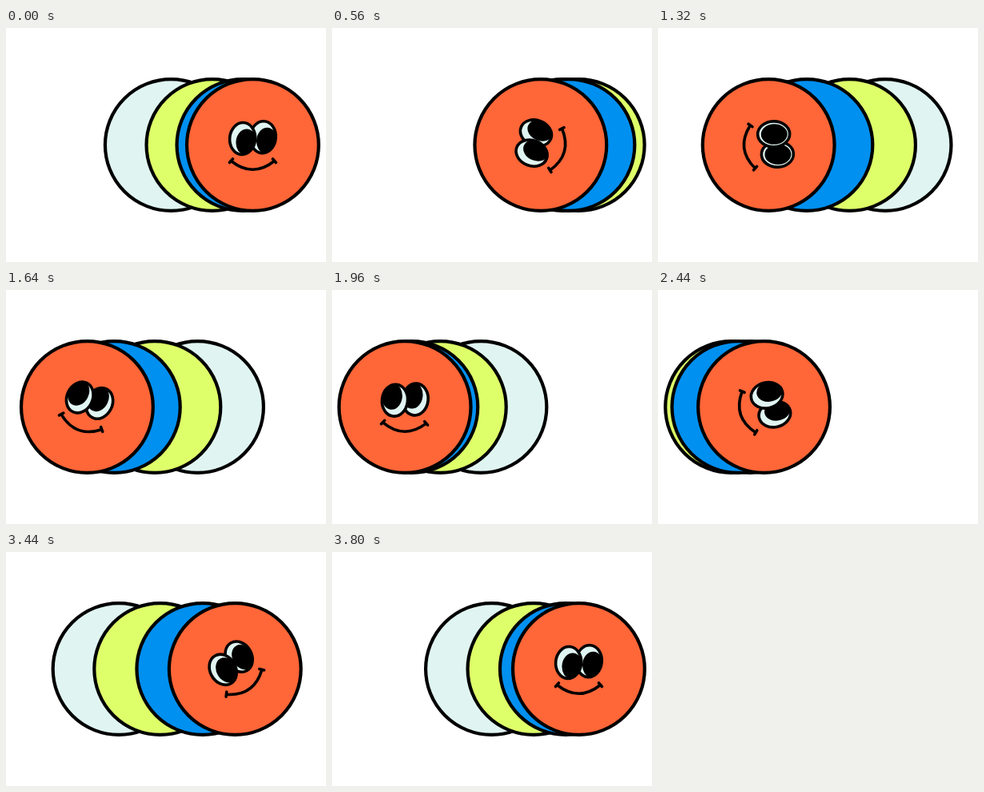
Recreate the animation shown at these times as an HTML page. Size 400 px wide and 293 px high, loop 3.84 s.

```html
<!DOCTYPE html>
<html lang="en">
<head>
<meta charset="utf-8">
<title>Rolling caterpillar</title>
<style>
  html, body { margin: 0; width: 100%; height: 100%; overflow: hidden; background: #fff; }
  svg { display: block; width: 100vw; height: 100vh; }
  .body { stroke: #000; stroke-width: 4.2; }
  .line { fill: none; stroke: #000; stroke-width: 3.6; stroke-linecap: round; stroke-linejoin: round; }
</style>
</head>
<body>
<svg viewBox="0 0 400 293">
  <defs>
    <clipPath id="socket"><ellipse rx="16" ry="20"/></clipPath>
    <g id="eye">
      <ellipse rx="16" ry="20" fill="#e0f5f2"/>
      <g clip-path="url(#socket)"><ellipse id="pupil" rx="12.8" ry="16.5"/></g>
      <ellipse class="line" rx="16" ry="20"/>
    </g>
  </defs>
  <g id="worm">
    <circle class="body" r="82.4" fill="#e0f5f2"/>
    <circle class="body" r="82.4" fill="#deff69"/>
    <circle class="body" r="82.4" fill="#0090f0"/>
    <g>
      <circle class="body" r="82.4" fill="#ff6638"/>
      <g id="face">
        <use href="#eye" transform="translate(12.8 -9.8) rotate(5)"/>
        <use href="#eye" transform="translate(-12.8 -8) rotate(5)"/>
        <path class="line" d="M-27 20Q0 41.5 27 20M-29 22L-25 17.5M29 22L25 17.5"/>
      </g>
    </g>
  </g>
</svg>
<script>
const LOOP = 3840, HALF = LOOP / 2, STEP = 40;
const LEFT = 90.5, RIGHT = 308.5, MID_Y = 146.5;
const SHIFTS = [-920, -600, -280, 20]; // tail to head, ms

const parts = [...document.getElementById('worm').children];
const face = document.getElementById('face');
const pupil = document.getElementById('pupil');

const ease = p => {
  p = Math.min(1, Math.max(0, p));
  return p * p * (3 - 2 * p);
};

// 0 at the right end, 1 at the left end
function swing(t) {
  t = (t + LOOP) % LOOP;
  const p = ease((t % HALF) / HALF);
  return t < HALF ? p : 1 - p;
}

// One full turn on the way out, one back
const turn = t => t < 1905
  ? -360 * ease(t / HALF)
  : -360 + 360 * ease((t - 1890) / HALF);

// 0 looks right and down, 1 looks left and up
function gaze(t) {
  const p = ease((t % HALF - 900) / 800);
  return t < HALF ? p : 1 - p;
}

function draw(t) {
  parts.forEach((part, i) => {
    const x = RIGHT + (LEFT - RIGHT) * swing(t + SHIFTS[i]);
    part.setAttribute('transform', `translate(${x} ${MID_Y})`);
  });
  face.setAttribute('transform', `rotate(${turn(t)})`);
  const g = gaze(t);
  pupil.setAttribute('cx', 5 - 9 * g);
  pupil.setAttribute('cy', 4 - 8.5 * g);
}

const start = performance.now();
function tick() {
  const t = (performance.now() - start) % LOOP;
  draw(Math.floor(t / STEP) * STEP);
  requestAnimationFrame(tick);
}
tick();
</script>
</body>
</html>
```
